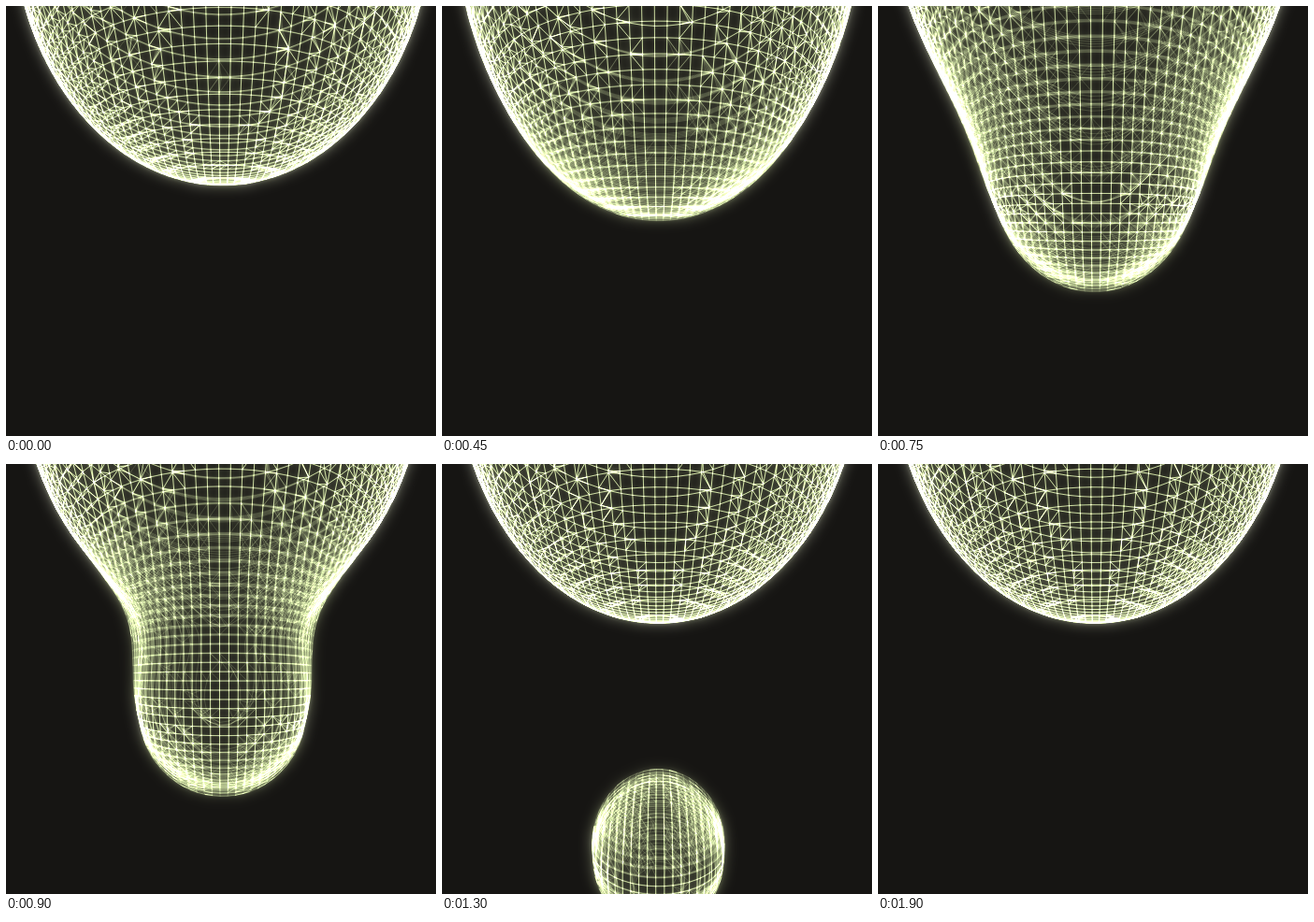
Write an HTML page with a canvas that moves like this. It is 460 by 460 pixels and loops after 2000 ms.

```html
<!DOCTYPE html>
<html>
<head>
<meta charset="utf-8">
<style>
html, body { margin: 0; width: 100%; height: 100%; overflow: hidden; background: #161513; }
canvas { display: block; }
</style>
</head>
<body>
<canvas id="stage" width="460" height="460"></canvas>
<script>
const SIZE = 460, PAD = 20, CX = 231.5, CY = 230, EYE = 330;
const CELL = 7.25, BLEND = 130;
const STEP = 50, LOOP = 2000, SUBS = 5, SHUTTER = 45;
const NX = 53, NY = 70, NZ = 31, X0 = -190.7, Y0 = -15, Z0 = -36.25;

// time, ball centre y, ball radius, drop centre y, drop radius
const KEYS = [
  [0, 4, 182, 4, 98],
  [250, -3, 182, 54, 98],
  [650, -14.6, 182, 170, 97],
  [900, -14.6, 182, 257, 87],
  [1100, -14.6, 182, 334, 72],
  [1500, -14.6, 182, 476, 66],
  [2000, -14.6, 182, 656, 66]
];

const ctx = document.getElementById('stage').getContext('2d');
const wire = document.createElement('canvas');
wire.width = wire.height = SIZE + 2 * PAD;
const pen = wire.getContext('2d');

function pose(t) {
  t = Math.max(0, Math.min(t, LOOP));
  const i = Math.max(1, KEYS.findIndex(k => k[0] >= t));
  const a = KEYS[i - 1], b = KEYS[i], u = (t - a[0]) / (b[0] - a[0]);
  return a.map((v, j) => v + (b[j] - v) * u);
}

// Smooth union of two balls, negative inside
function field(x, y, z, big, drop) {
  const q = x * x + z * z, y1 = y - big[1], y2 = y - drop[3];
  const d1 = Math.sqrt(q + y1 * y1) - big[2];
  const d2 = Math.sqrt(q + y2 * y2) - drop[4];
  const h = Math.max(0, 1 - Math.abs(d1 - d2) / BLEND);
  return Math.min(d1, d2) - h * h * BLEND / 4;
}

function project(x, y, z) {
  const s = EYE / (EYE - z);
  return [CX + x * s, CY + (y - CY) * s];
}

// Cube corners are numbered x + 2y + 4z; faces wind outward, low faces first
const FACES = [
  [0, 4, 6, 2], [0, 1, 5, 4], [0, 2, 3, 1],
  [1, 3, 7, 5], [2, 6, 7, 3], [4, 5, 7, 6]
];
const ROW = NX, LAYER = NX * NY;
const CORNERS = [...Array(8).keys()].map(c =>
  (c & 1) + (c >> 1 & 1) * ROW + (c >> 2) * LAYER);
const grid = new Float32Array(NX * NY * NZ);
const next = new Int8Array(64), faceOf = new Int8Array(64);

function line(p, q) {
  pen.moveTo(p[0], p[1]);
  pen.lineTo(q[0], q[1]);
}

function drawCell(i, j, k) {
  const base = i + j * ROW + k * LAYER;
  let inside = 0;
  for (let c = 0; c < 8; c++) if (grid[base + CORNERS[c]] < 0) inside++;
  if (inside === 0 || inside === 8) return;

  const value = c => grid[base + CORNERS[c]];
  const point = key => {
    const a = key >> 3, b = key & 7, u = value(a) / (value(a) - value(b));
    const mix = bit => (a >> bit & 1) * (1 - u) + (b >> bit & 1) * u;
    return project(
      X0 + CELL * (i + mix(0)), Y0 + CELL * (j + mix(1)), Z0 + CELL * (k + mix(2)));
  };

  // On each face, link the edge that leaves the solid to the one that enters it
  next.fill(-1);
  FACES.forEach((face, f) => {
    for (let n = 0; n < 4; n++) {
      const a = face[n], b = face[(n + 1) % 4];
      if (!(value(a) < 0 && value(b) >= 0)) continue;
      for (let m = 1; m < 4; m++) {
        const c = face[(n + m) % 4], d = face[(n + m + 1) % 4];
        if (value(c) >= 0 && value(d) < 0) {
          next[a * 8 + b] = d * 8 + c;
          faceOf[a * 8 + b] = f;
          break;
        }
      }
    }
  });

  for (let start = 0; start < 64; start++) {
    if (next[start] < 0) continue;
    const loop = [], faces = [];
    for (let key = start; next[key] >= 0;) {
      loop.push(point(key));
      faces.push(faceOf[key]);
      const to = next[key];
      next[key] = -1;
      key = to;
    }
    drawPolygon(loop, faces);
  }
}

// Outlines front-facing polygons and splits the larger ones into fans
function drawPolygon(loop, faces) {
  const after = n => loop[(n + 1) % loop.length];
  const area = loop.reduce((sum, p, n) => sum + p[0] * after(n)[1] - p[1] * after(n)[0], 0);
  if (area >= 0) return;
  loop.forEach((p, n) => { if (faces[n] < 3) line(p, after(n)); });
  if (loop.length > 4)
    for (let n = 2; n < loop.length - 1; n++) line(loop[0], loop[n]);
}

function drawSurface(big, drop) {
  let n = 0;
  for (let k = 0; k < NZ; k++)
    for (let j = 0; j < NY; j++)
      for (let i = 0; i < NX; i++)
        grid[n++] = field(X0 + CELL * i, Y0 + CELL * j, Z0 + CELL * k, big, drop);

  for (let k = 0; k < NZ - 1; k++) {
    pen.beginPath();
    for (let j = 0; j < NY - 1; j++)
      for (let i = 0; i < NX - 1; i++) drawCell(i, j, k);
    pen.stroke();
  }
}

function glow(blur, alpha) {
  ctx.filter = blur ? `blur(${blur}px)` : 'none';
  ctx.globalAlpha = alpha;
  ctx.drawImage(wire, -PAD, -PAD);
}

function render(t) {
  pen.setTransform(1, 0, 0, 1, 0, 0);
  pen.clearRect(0, 0, wire.width, wire.height);
  pen.translate(PAD, PAD);
  pen.globalCompositeOperation = 'lighter';
  pen.strokeStyle = `rgba(208, 228, 160, ${0.75 / SUBS})`;
  const big = pose(t);
  for (let s = 0; s < SUBS; s++)
    drawSurface(big, pose(t + ((s + 0.5) / SUBS - 0.5) * SHUTTER));

  ctx.globalCompositeOperation = 'source-over';
  ctx.globalAlpha = 1;
  ctx.filter = 'none';
  ctx.fillStyle = '#161513';
  ctx.fillRect(0, 0, SIZE, SIZE);
  ctx.globalCompositeOperation = 'lighter';
  glow(7, 0.5);
  glow(2, 0.25);
  glow(0, 1);
}

// Each step is drawn once and then reused
const cache = [];
let shown = -1;

function show(frame) {
  if (cache[frame]) {
    ctx.globalCompositeOperation = 'copy';
    ctx.globalAlpha = 1;
    ctx.filter = 'none';
    ctx.drawImage(cache[frame], 0, 0);
    return;
  }
  render(frame * STEP);
  const copy = cache[frame] = document.createElement('canvas');
  copy.width = copy.height = SIZE;
  copy.getContext('2d').drawImage(ctx.canvas, 0, 0);
}

function tick() {
  const frame = Math.min(38, Math.floor(performance.now() % LOOP / STEP));
  if (frame !== shown) show(shown = frame);
  requestAnimationFrame(tick);
}
tick();
</script>
</body>
</html>
```
